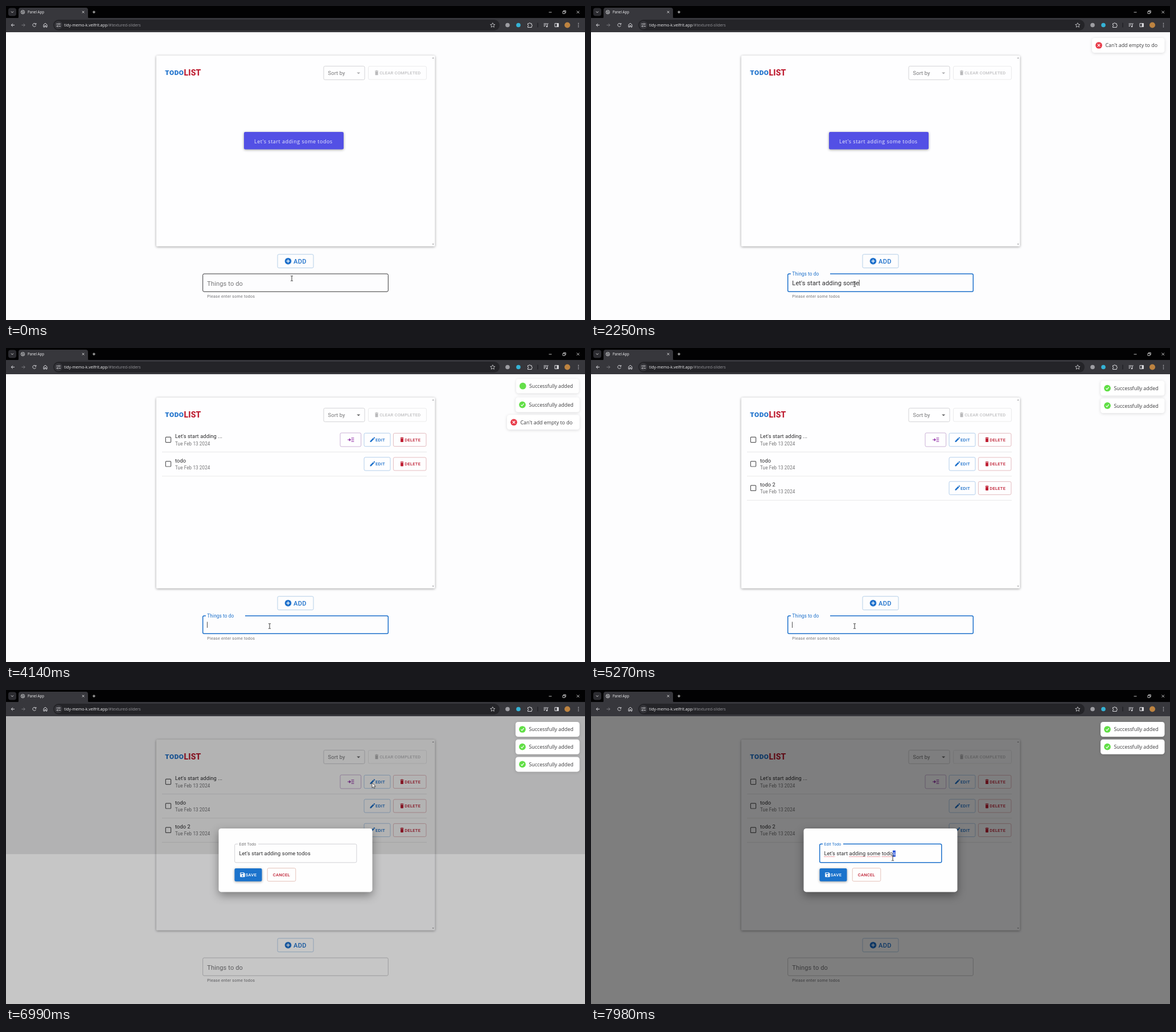
Animation of 1017x551 px, one loop 8000 ms. Source, as an HTML page:

```html
<!DOCTYPE html>
<html lang="en">
<head>
<meta charset="utf-8">
<title>Todo list</title>
<style>
  html, body { margin: 0; width: 100%; height: 100%; overflow: hidden; background: #fdfdfe; }
  svg { display: block; width: 100vw; height: 100vh; }
  text { font-family: Roboto, sans-serif; white-space: pre; }
  .ui { font-family: "Open Sans", "Noto Sans", sans-serif; }
  .card { filter: drop-shadow(0 1.2px 2px rgba(0,0,0,.38)); }
  .soft { filter: drop-shadow(0 1.5px 2.5px rgba(0,0,0,.14)); }
  .deep { filter: drop-shadow(0 6px 8px rgba(0,0,0,.38)); }
</style>
</head>
<body>
<svg viewBox="0 0 1017 551" preserveAspectRatio="none">
  <g id="page"></g>
  <g id="browser"></g>
  <g id="pointer"></g>
</svg>
<script>
const LOOP = 8000;
const BLUE = '#1c70cb', RED = '#bf2034', PURPLE = '#8a1fa0', INK = '#2a2a2c', MUTED = '#747476';
const ENTRIES = [
  { text: "Let's start adding some todos", from: 1250, to: 2540, enter: 2680 },
  { text: 'todo', from: 3320, to: 3740, enter: 3920 },
  { text: 'todo 2', from: 4420, to: 5040, enter: 5240 },
];
const ADD_CLICK = 400, FIELD_CLICK = 880, EDIT_CLICK = 6820, MODAL_CLICK = 7480;
const TOAST_LIFE = 4500;
const TOASTS = [
  { born: ADD_CLICK, ok: false },
  ...ENTRIES.map(e => ({ born: e.enter, ok: true })),
];
const MOUSE = [
  [0, 502, 478], [280, 510, 452], [560, 510, 452], [880, 424, 494], [1500, 424, 494],
  [1900, 463, 488], [5830, 463, 488], [6300, 310, 160], [6380, 310, 160],
  [6760, 643, 163], [7030, 643, 163], [7400, 537, 291], [7800, 537, 291], [7970, 530, 295],
];

const clamp = v => Math.max(0, Math.min(1, v));
const mix = (a, b, k) => a + (b - a) * k;
const ramp = (t, start, length) => clamp((t - start) / length);
const smooth = k => k * k * (3 - 2 * k);

function bezier(x1, y1, x2, y2) {
  const at = (s, a, b) => 3 * (1 - s) ** 2 * s * a + 3 * (1 - s) * s * s * b + s ** 3;
  return x => {
    if (x <= 0 || x >= 1) return clamp(x);
    let lo = 0, hi = 1;
    for (let i = 0; i < 20; i++) {
      const mid = (lo + hi) / 2;
      if (at(mid, x1, x2) < x) lo = mid; else hi = mid;
    }
    return at(lo, y1, y2);
  };
}
const easeIn = bezier(.21, 1.02, .73, 1);
const easeExit = bezier(.06, .71, .55, 1);
const easePop = bezier(.175, .885, .32, 1.275);

// SVG helpers
const text = (x, y, s, size, fill, gap = .00938, more = '') =>
  `<text x="${x}" y="${y}" font-size="${size}" fill="${fill}" letter-spacing="${gap * size}" ${more}>${s}</text>`;
const box = (x, y, w, h, r, fill, more = '') =>
  `<rect x="${x}" y="${y}" width="${w}" height="${h}" rx="${r}" fill="${fill}" ${more}/>`;
const outline = (x, y, w, h, color, width = .7, fill = 'none') =>
  box(x, y, w, h, 2.3, fill, `stroke="${color}" stroke-width="${width}"`);
const line = (d, color, width = 1, more = '') =>
  `<path d="${d}" fill="none" stroke="${color}" stroke-width="${width}" ${more}/>`;
const shape = (d, fill, more = '') => `<path d="${d}" fill="${fill}" ${more}/>`;
const dot = (x, y, r, fill, more = '') => `<circle cx="${x}" cy="${y}" r="${r}" fill="${fill}" ${more}/>`;
const group = (transform, inner, more = '') => `<g transform="${transform}" ${more}>${inner}</g>`;
const caps = (x, y, s, fill, size = 7.58) => text(x, y, s, size, fill, .02857, 'font-weight="500"');
const ui = (x, y, s, size, fill, gap = 0) => text(x, y, s, size, fill, gap, 'class="ui"');

const pen = document.createElement('canvas').getContext('2d');
function textWidth(s, size) {
  pen.font = `${size * 10}px Roboto, sans-serif`;
  return pen.measureText(s).width / 10 + s.length * .00938 * size;
}

const trash = (x, y, fill) =>
  group(`translate(${x} ${y})`, shape('M-3-4h1.6l.6-.6h1.6l.6.6H3v1H-3zM-2.5-2.4h5v5.4q0 .9-.9.9h-3.2q-.9 0-.9-.9z', fill));
const pencil = (x, y, fill) =>
  group(`translate(${x} ${y})`, shape('M-4 4v-1.8L1.4-3.2 3.2-1.4-2.2 4zM2-3.8l.8-.8q.4-.3.8 0l1 1q.3.4 0 .8l-.8.8z', fill));

function browser() {
  const grey = '#d8d8dc';
  const stroke = (d, w = 1) => line(d, grey, w);
  return box(0, 0, 1017, 22, 0, '#020203') +
    box(4, 3.5, 14, 14, 4, '#2c2c31') + line('M9 9.6l2 2 2-2', '#eee', .9) +
    shape('M19 22q3 0 3-3V7q0-4 4-4h114q4 0 4 4v12q0 3 3 3z', '#37373c') +
    dot(29.5, 10.7, 3.3, '#55565a', 'stroke="#c9c9cc" stroke-width=".8"') +
    line('M27 9.5l2.5 1 1.5-2M28 13l2-1.5 2 .5', '#c9c9cc', .8) +
    ui(38, 13, 'Panel App', 6.2, '#f2f2f4') +
    line('M133.8 8.8l3.6 3.6m0-3.6l-3.6 3.6M152 10.7h5m-2.5-2.5v5', '#eee', .9) +
    line('M953.5 11h5M1002.5 8.5l4.5 4.5m0-4.5l-4.5 4.5M978 9.5h3.8v3.8H978zM979.4 9.3v-1.2h3.8v3.8h-1.2', '#eee', .8) +
    box(0, 21, 1017, 25, 0, '#37373c') +
    stroke('M15 33.5H9.3m2.7-2.8l-2.8 2.8 2.8 2.8') +
    line('M27.5 33.5h5.7m-2.7-2.8l2.8 2.8-2.8 2.8', '#77777c') +
    stroke('M52.2 31.7a2.9 2.9 0 1 0 .3 2.7M52.8 30v2.2h-2.2') +
    stroke('M66 37v-4.2l3-2.5 3 2.5V37h-2v-2.5h-2V37z') +
    box(83, 24, 784, 19, 9.5, '#242428') + dot(92, 33.5, 7, '#37373c') +
    stroke('M88.5 31.6h3m3.2 0h1.3M88.5 35.4h1.3m3.2 0h3') +
    line('M94.2 31.6a1 1 0 1 0-2 0a1 1 0 1 0 2 0M91.8 35.4a1 1 0 1 0-2 0a1 1 0 1 0 2 0', grey, .8) +
    ui(102, 36.2, 'tidy-memo-k.velfrit.app<tspan fill="#97979c">/#textured-sliders</tspan>', 7, '#f0f0f2') +
    stroke('M854.8 29.6l1.2 2.6 2.9.3-2.2 1.9.7 2.8-2.6-1.5-2.6 1.5.7-2.8-2.2-1.9 2.9-.3z', .8) +
    dot(881, 33.5, 3.8, '#9d9da2') + dot(900, 33.5, 3.8, '#35b3d6') +
    stroke('M916.5 30.8h2.1a1.2 1.2 0 0 1 2.4 0h2.2v2.3a1.2 1.2 0 0 1 0 2.4v2h-6.7v-2a1.2 1.2 0 0 0 0-2.4z') +
    line('M934 29.5v8', '#17171a', 1) +
    stroke('M944.5 31h5.5m-5.5 2.2h4m-4 2.2h2.5M950.8 36v-5h1.8') + dot(950, 36, 1.3, grey) +
    stroke('M964 30.5h6.4v6h-6.4z') + box(967.5, 30.5, 3, 6, 0, grey) +
    dot(986, 33.5, 5, '#bd8340') +
    [30.5, 33.5, 36.5].map(y => dot(1005.5, y, .8, grey)).join('');
}

function row(entry, i, hover) {
  const y = 161 + i * 42.4;
  const title = entry.text.length > 20 ? entry.text.slice(0, 19) + '...' : entry.text;
  const sortButton = outline(587, -12, 36.6, 24, '#b591c4') +
    line('M600 0h5m-2.2-2.2L605 0l-2.2 2.2M606.5-3h4.8M606.5 0h4.8M606.5 3h4.8', PURPLE, 1.2);
  return group(`translate(0 ${y})`,
    (hover ? dot(285, 0, 11, BLUE, 'opacity=".06"') : '') +
    box(280.4, -4.6, 9.2, 9.2, 1, 'none', 'stroke="#5c5c5e" stroke-width="1.2"') +
    text(297, -2.7, title, 9.33, INK) + text(297, 9.7, 'Tue Feb 13 2024', 8.16, MUTED, .01071) +
    (i ? '' : sortButton) +
    outline(629, -11.6, 46, 23.3, '#94bbe2') + pencil(643.5, 0, BLUE) + caps(649, 2.7, 'EDIT', BLUE) +
    outline(680.4, -11.4, 57.6, 23, '#d9a0a4') + trash(695.5, .2, RED) + caps(700.3, 2.7, 'DELETE', RED) +
    line('M274 21.5H739', '#dedee0', .7));
}

function card(t, rows, mouse, modal) {
  const hoverRow = !modal && mouse.x > 275 && mouse.x < 390 ? Math.round((mouse.y - 161) / 42.4) : -1;
  const empty = box(418, 221, 175, 30.5, 2.3, '#5350e5', 'class="card"') +
    ui(436, 240.7, ENTRIES[0].text, 9, '#ebebff', .054);
  return box(264, 87, 489.5, 334.7, 1.5, '#fefeff', 'class="card"') +
    shape('M748.6 92l1.6-1.8 1.6 1.8zM748.6 417.2l1.6 1.8 1.6-1.8z', '#88888b') +
    text(279.3, 121, 'TODO', 11.8, BLUE, .04, 'font-weight="900"') +
    text(312.6, 121.5, 'LIST', 14, RED, .01, 'font-weight="900"') +
    outline(558, 105.6, 72, 23.8, '#c2c2c5') + text(565.6, 121, 'Sort by', 9.33, MUTED) +
    shape('M616.2 116.4h6l-3 3z', rows.length > 1 ? '#68686a' : '#adadb0') +
    outline(636.5, 105.8, 102, 23.2, '#e1e1e3') + trash(651, 117.4, '#b9b9bb') +
    caps(656.2, 120, 'CLEAR COMPLETED', '#bfbfc1') +
    (rows.length ? rows.map((e, i) => row(e, i, i === hoverRow)).join('') : empty);
}

function inputArea(t, mouse) {
  const focused = t >= FIELD_CLICK && t < EDIT_CLICK;
  const error = t >= ADD_CLICK && t < ENTRIES[0].from;
  const hover = mouse.y > 469 && mouse.y < 502;
  const accent = error ? RED : focused ? BLUE : MUTED;
  const border = error || focused ? accent : hover && t < EDIT_CLICK ? '#222224' : '#c2c2c5';
  const shrink = smooth(ramp(t, FIELD_CLICK, 180)) * (1 - smooth(ramp(t, EDIT_CLICK, 160)));
  const overAdd = mouse.y > 435 && mouse.y < 460;
  const typing = ENTRIES.find(e => t >= e.from && t < e.enter);
  const value = typing ? typing.text.slice(0, Math.ceil(ramp(t, typing.from, typing.to - typing.from) * typing.text.length)) : '';
  const touched = ENTRIES.flatMap(e => [e.from, e.to, e.enter]).filter(m => m <= t).pop() || FIELD_CLICK;
  const caretOn = focused && (typing && t < typing.to || Math.floor((t - touched) / 530) % 2 === 0);
  const caretX = 353.5 + textWidth(value, 11.1);
  const top = shrink > .4 ? 'M420 470H669q2.3 0 2.3 2.3V499q0 2.3-2.3 2.3H348q-2.3 0-2.3-2.3V472.3q0-2.3 2.3-2.3h3'
    : 'M348 470H669q2.3 0 2.3 2.3V499q0 2.3-2.3 2.3H348q-2.3 0-2.3-2.3V472.3q0-2.3 2.3-2.3z';
  return outline(477, 435.8, 63, 23.8, overAdd ? BLUE : '#a3c3e2', .8, overAdd ? '#f3f8fd' : 'none') +
    dot(495.5, 447.7, 5.8, BLUE) + line('M492.5 447.7h6m-3-3v6', '#fff', 1.3) + caps(505, 451.7, 'ADD', BLUE, 11.1) +
    line(top, border, focused ? 1.5 : .9) +
    text(353.3, mix(491, 473.1, shrink), 'Things to do', mix(11.1, 8.35, shrink), accent) +
    text(353.3, 489.6, value, 11.1, INK) +
    (caretOn ? line(`M${caretX} 480.5v10.5`, '#222', .8) : '') +
    text(353.3, 511.8, 'Please enter some todos', 7.1, error ? RED : MUTED, .0333);
}

function dialog(t) {
  if (t < EDIT_CLICK) return '';
  const lower = .5 * ramp(t, 6850, 320), upper = .5 * ramp(t, 6800, 320);
  const focus = t >= MODAL_CLICK;
  const selected = t >= 7930;
  const caretOn = focus && !selected && (t - MODAL_CLICK) % 1060 < 530;
  const words = ENTRIES[0].text;
  const end = 409.4 + textWidth(words, 9.33), cut = 409.4 + textWidth(words.slice(0, -1), 9.33);
  const label = selected ? `${words.slice(0, -1)}<tspan fill="#fff">s</tspan>` : words;
  const panel = box(373.5, 243, 270, 111.4, 4.5, '#fefefe', 'class="deep"') +
    line('M443 270.3H613.5q2.3 0 2.3 2.3V300.5q0 2.3-2.3 2.3H404q-2.3 0-2.3-2.3V272.6q0-2.3 2.3-2.3h3', focus ? BLUE : '#c6c6cc', focus ? 1.5 : .8) +
    text(409.6, 272.6, 'Edit Todo', 7, focus ? BLUE : MUTED) +
    (selected ? box(cut, 281.6, end - cut, 11, 0, '#2853d8') : '') +
    text(409.4, 290.4, label, 9.33, INK) +
    (focus ? line('M409.5 292.4h19M453.5 292.4h28.5M485 292.4h23.5M511 292.4h18.5', '#e0404c', .9, 'stroke-dasharray="1.3 1"') : '') +
    (caretOn ? line(`M${end} 282v10`, '#222', .8) : '') +
    box(401.5, 313, 48, 22.8, 2.3, '#1b73cc', 'class="card"') +
    shape('M412 320.3h5.8l1.8 1.8v5.4q0 .8-.8.8H412q-.8 0-.8-.8v-6.4q0-.8.8-.8z', '#fff') +
    box(412.4, 321.3, 4.6, 1.9, 0, '#1b73cc') + dot(415.4, 326, 1.2, '#1b73cc') +
    caps(420.8, 326.8, 'SAVE', '#fff') +
    outline(459.2, 312.6, 49.6, 23, '#dcab9f') + caps(468.8, 326.8, 'CANCEL', RED);
  return box(0, 46, 1017, 242, 0, '#000', `opacity="${upper}"`) +
    box(0, 288, 1017, 263, 0, '#000', `opacity="${lower}"`) +
    `<g opacity="${ramp(t, EDIT_CLICK, 130)}">${panel}</g>`;
}

function toast(t, item) {
  const age = t - item.born;
  const leave = easeExit(ramp(age, TOAST_LIFE, 400));
  if (age < 0 || leave >= 1) return '';
  const enter = easeIn(ramp(age, 0, 350));
  const slot = TOASTS.filter(o => o.born > item.born)
    .reduce((sum, o) => sum + smooth(ramp(t, o.born, 230)), 0);
  const width = item.ok ? 112.5 : 127.5, left = -width / 2;
  const y = 69 + slot * 30.7 - 52 * (1 - enter) - 39 * leave;
  const scale = mix(.6, 1, enter) * mix(1, .6, leave);
  const pop = easePop(ramp(age, 100, 300)), mark = ramp(age, 240, 160);
  const glyph = item.ok ? 'M-2.5.2l1.8 1.9L2.6-2' : 'M-2.3-2.3l4.6 4.6M2.3-2.3l-4.6 4.6';
  const icon = dot(0, 0, 5.85, item.ok ? '#61df46' : '#e83a48') +
    (mark ? line(glyph, '#fff', 1.2, `pathLength="1" stroke-dasharray="${item.ok ? mark : 1} 1"`) : '');
  return group(`translate(${1007.5 - width / 2} ${y}) scale(${scale})`,
    box(left, -13, width, 26, 4.5, '#fff', 'class="soft"') +
    group(`translate(${left + 12} 0) scale(${pop})`, icon) +
    ui(left + 23.4, 3.3, item.ok ? 'Successfully added' : "Can't add empty to do", 8.9, '#3a3a3c'),
    `opacity="${mix(.5, 1, enter) * (1 - leave)}"`);
}

function mouseAt(t) {
  const next = MOUSE.findIndex(p => p[0] > t);
  if (next < 0) return { x: MOUSE.at(-1)[1], y: MOUSE.at(-1)[2] };
  const [a, b] = [MOUSE[next - 1], MOUSE[next]];
  const k = smooth((t - a[0]) / (b[0] - a[0]));
  return { x: mix(a[1], b[1], k), y: mix(a[2], b[2], k) };
}

function pointer({ x, y }, rowCount, modal) {
  const within = (l, top, r, b) => x > l && x < r && y > top && y < b;
  const bar = modal ? within(401, 270, 616, 303) : within(346, 469, 671, 502);
  const hand = !modal && (within(477, 435, 540, 460) ||
    [0, 1, 2].slice(0, rowCount).some(i => within(275, 149 + i * 42.4, 390, 173 + i * 42.4) || within(629, 149 + i * 42.4, 738, 173 + i * 42.4)));
  const edge = 'stroke="#1c1c1e" stroke-width=".7" stroke-linejoin="round"';
  const art = bar ? line('M-2-4.3h1.5l.5.5.5-.5H2M0-3.8v7.6M-2 4.3h1.5l.5-.5.5.5H2', '#222', .9)
    : hand ? shape('M-2.8-5.2q.9-1 1.7 0V-1.4q.9-.8 1.7.1.9-.7 1.7.2 1.2-.5 1.6.7V2.6L3 5.2H-1.6L-4.8.6q.4-1.3 2 .3z', '#fff', edge)
    : shape('M0 0v8.6l2-1.8 1.3 3 1.5-.7-1.3-2.9h2.7z', '#fff', edge);
  return group(`translate(${x} ${y})`, art);
}

const layer = id => document.getElementById(id);
layer('browser').innerHTML = browser();

function draw(t) {
  const mouse = mouseAt(t), modal = t >= EDIT_CLICK;
  const rows = ENTRIES.filter(e => t >= e.enter);
  layer('page').innerHTML = box(0, 46, 1017, 505, 0, '#fdfdfe') +
    card(t, rows, mouse, modal) + inputArea(t, mouse) + dialog(t) +
    TOASTS.map(item => toast(t, item)).join('');
  layer('pointer').innerHTML = pointer(mouse, rows.length, modal);
}

const start = performance.now();
function tick() {
  draw((performance.now() - start) % LOOP);
  requestAnimationFrame(tick);
}
tick();
</script>
</body>
</html>
```
